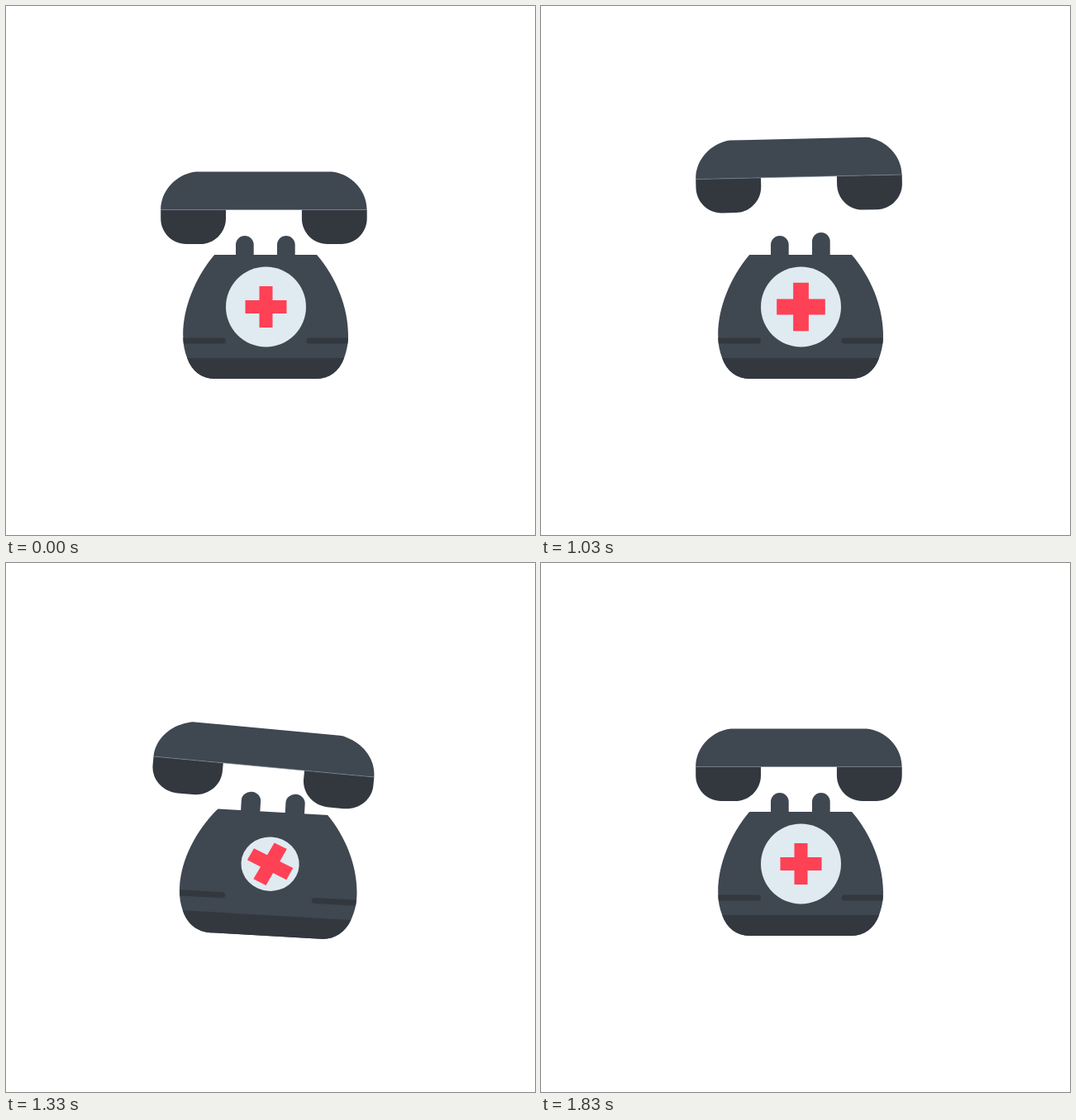
Write an HTML page without scripts that moves like this. It is 640 px wide and 640 px high and loops after 3.73 s.

```html
<!DOCTYPE html>
<html lang="en">
<head>
<meta charset="utf-8">
<title>Ringing phone</title>
<style>
  html, body { margin: 0; width: 100%; height: 100%; overflow: hidden; background: #fff; }
  svg { display: block; width: 100%; height: 100%; }

  .body { fill: #3f4751; }
  .dark { fill: #33383f; }
  .seam { stroke: #7f8b95; stroke-width: .6; }

  .move {
    animation: 3730ms cubic-bezier(.33, 0, .67, 1) infinite;
  }
  .handset { transform-origin: 312px 246.5px; animation-name: lift, rock, squash; }
  .base    { transform-origin: 314px 451px;   animation-name: sway, squash; }
  .dial    { transform-origin: 314.5px 364px; animation-name: shrink; }
  .cross   { transform-origin: 314.5px 364px; animation-name: twist, pulse; }
  .left    { animation-name: popLeft; }
  .right   { animation-name: popRight; }

  @keyframes lift {
    0%, 20.62% { translate: 0 0; }
    20.64% { translate: 0 -.7px; animation-timing-function: cubic-bezier(.3, .05, .67, 1); }
    28.85% { translate: 0 -42px; }
    33.6%, 100% { translate: 0 0; }
  }
  @keyframes rock {
    0%, 20.62% { rotate: 0deg; }
    20.64% { rotate: -.75deg; animation-timing-function: cubic-bezier(.25, .2, .67, 1); }
    25.1% { rotate: -8deg; }
    30.8%, 35.63% { rotate: 8deg; }
    35.65% { rotate: 5.4deg; animation-timing-function: linear; }
    38.33% { rotate: 1.8deg; animation-timing-function: ease-out; }
    42.9%, 100% { rotate: 0deg; }
  }
  @keyframes squash {
    0%, 28.7% { scale: 1 1; }
    31.37% { scale: .9 1; }
    34.05%, 35.63% { scale: 1.1 1; }
    35.65% { scale: 1.075 1; animation-timing-function: linear; }
    38.33% { scale: 1 1; animation-timing-function: ease-out; }
    39.9% { scale: .98 1; }
    43% { scale: 1.015 1; }
    47%, 100% { scale: 1 1; }
  }
  @keyframes sway {
    0%, 30.25% { rotate: 0deg; }
    34.05%, 35.63% { rotate: 5deg; }
    35.65% { rotate: 3.4deg; animation-timing-function: linear; }
    38.33% { rotate: -2.1deg; animation-timing-function: ease-out; }
    39.4% { rotate: -2.6deg; }
    42.9% { rotate: 1.2deg; }
    46.1% { rotate: -.5deg; }
    49.06%, 100% { rotate: 0deg; }
  }
  @keyframes twist {
    0%, 30.83% { rotate: 0deg; }
    34.05%, 35.63% { rotate: 30deg; }
    35.65% { rotate: 25.5deg; animation-timing-function: linear; }
    38.33% { rotate: -13.5deg; animation-timing-function: ease-out; }
    39.4% { rotate: -16deg; }
    42.9% { rotate: 8deg; }
    46.1% { rotate: -3deg; }
    49.06%, 100% { rotate: 0deg; }
  }
  @keyframes pulse {
    0%, 20.62% { scale: 1; }
    26.8% { scale: 1.18; }
    33.6%, 100% { scale: 1; }
  }
  @keyframes shrink {
    0%, 31.37% { scale: 1; }
    34.05%, 35.63% { scale: .57; }
    35.65% { scale: .67; animation-timing-function: linear; }
    38.33%, 100% { scale: 1; }
  }
  @keyframes popLeft {
    0%, 22.4% { translate: 0 0; }
    25.1% { translate: 0 -4px; }
    27.8%, 100% { translate: 0 0; }
  }
  @keyframes popRight {
    0%, 25.1% { translate: 0 0; }
    27.8% { translate: 0 -4px; }
    30.5%, 100% { translate: 0 0; }
  }
</style>
</head>
<body>
<svg viewBox="0 0 640 640">
  <g class="move base">
    <rect class="body move left" x="278" y="278" width="21.7" height="40" rx="10.85"/>
    <rect class="body move right" x="328" y="278" width="21.7" height="40" rx="10.85"/>
    <path class="body" d="M252.2 301H376C400 329 414 365 414 398C414 409 412 418 409 426C403 442 391 451 376 451H252C237 451 225 442 219.2 426C216 418 214.2 409 214.2 398C214.2 365 228.6 329 252.2 301Z"/>
    <g class="dark">
      <path d="M219.2 426H409C403 442 391 451 376 451H252C237 451 225 442 219.2 426Z"/>
      <path d="M214.3 401.5H262.5a3.5 3.5 0 0 1 0 7H214.8Z"/>
      <path d="M413.9 401.5H367a3.5 3.5 0 0 0 0 7H413.4Z"/>
    </g>
    <circle class="move dial" cx="314.5" cy="364" r="48.5" fill="#dfebf1"/>
    <path class="move cross" fill="#ff4155" d="M306.5 339h16v17h17v16h-17v17h-16v-17h-17v-16h17Z"/>
  </g>
  <g class="move handset">
    <path class="body" d="M187.2 246.5C187.2 225 203 207.5 222 202Q226 200.4 230 200.4H394Q398 200.4 402 202C421 207.5 436.6 225 436.6 246.5Z"/>
    <g class="dark">
      <path d="M187.2 246.5H266V257C266 274 252 288 235 288H218C201 288 187.2 274 187.2 257Z"/>
      <path d="M357.9 246.5H436.7V257C436.7 274 422.7 288 405.7 288H388.7C371.7 288 357.9 274 357.9 257Z"/>
    </g>
    <path class="seam" d="M187.2 246.5H436.6"/>
  </g>
</svg>
</body>
</html>
```
